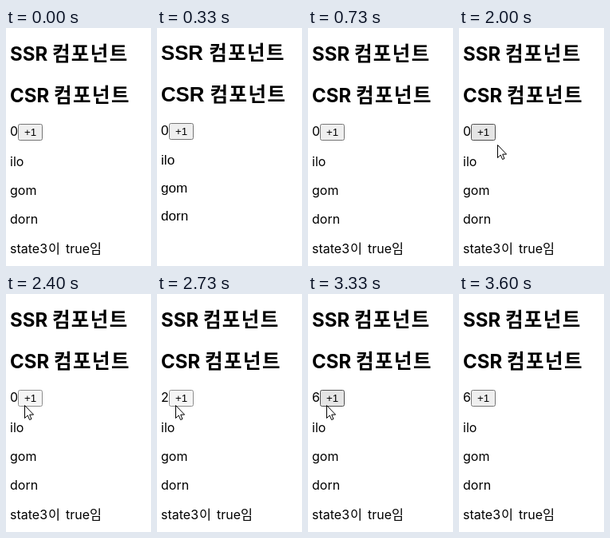
Animation, 182 px wide and 298 px high, one loop 3.99 s. Source, as an HTML page:

```html
<!DOCTYPE html>
<html lang="ko">
<head>
<meta charset="utf-8">
<style>
  html, body { margin: 0; width: 100%; height: 100%; overflow: hidden; background: #fff; }
  svg { display: block; width: 182px; height: 298px; }
  text { white-space: pre; }
  .web { font: 16px Inter, sans-serif; }
  .web .h { font-size: 24px; font-weight: 700; }
  .plain { font: 17.18px "Liberation Sans", Arial, sans-serif; }
  .plain .h { font-size: 25.78px; font-weight: 700; }
  .ko { font-family: "Noto Sans CJK KR", "Noto Sans CJK", sans-serif; font-size: 16.3px; letter-spacing: 1px; }
  .h .ko { font-size: 24.5px; letter-spacing: 1.45px; }
  #btn { font: 13.333px "Liberation Sans", Arial, sans-serif; }
</style>
</head>
<body>
<svg viewBox="0 0 182 298">
  <rect width="182" height="298" fill="#fff"/>
  <g id="web" class="web"></g>
  <g id="plain" class="plain"></g>
  <g id="btn">
    <rect id="face" x="15.5" y="120.5" width="30" height="20" rx="2"/>
    <text x="23" y="135">+1</text>
  </g>
  <path id="cursor" d="M.5 .5V16.5L4.2 13L6.6 18.5L9 17.5L6.7 12.1H11.6Z" fill="#fff" stroke="#000"/>
</svg>
<script>
const LOOP = 3990;
const $ = id => document.getElementById(id);
const show = (el, on) => el.setAttribute("visibility", on ? "visible" : "hidden");

const ko = (s, dx = 0) => `<tspan class="ko" dx="${dx}">${s}</tspan>`;
const line = (y, s, attr = "") => `<text x="5" y="${y}" ${attr}>${s}</text>`;
const head = (y, s) => line(y, `${s} ${ko("컴포넌트")}`, 'class="h"');

function page(el, top, first, step) {
  el.innerHTML = head(top, "SSR") + head(top + 52, "CSR") +
    line(top + 94, "0", 'class="count"') +
    ["ilo", "gom", "dorn"].map((s, i) => line(first + i * step, s)).join("");
}
page($("web"), 41, 173, 36);
page($("plain"), 40, 171, 35);
$("web").insertAdjacentHTML("beforeend",
  line(282, `state3${ko("이", 1)}<tspan dx="1.5"> true</tspan>${ko("임")}`, 'id="state"'));
const count = $("web").querySelector(".count");

// Button looks: [fill, border]
const looks = {
  idle: ["#efefef", "#767676"],
  hover: ["#e5e5e5", "#4f4f4f"],
  down: ["#f5f5f5", "#8d8d8d"]
};
const presses = [2400, 2530, 2730, 2930, 3130, 3270];
const releases = [2470, 2670, 2870, 3070, 3200, 3330];

// Pointer stops: [time, x, y]
const stops = [
  [2000, 48, 146], [2070, 0, 107], [2270, 20, 134],
  [2330, 23, 139], [3470, 70, 159], [3530, 148, 193]
];
const passed = (list, t) => list.filter(v => v <= t).length;

function draw(t) {
  const fallback = t >= 330 && t < 530;
  show($("web"), !fallback);
  show($("plain"), fallback);
  $("state").setAttribute("display", t >= 330 && t < 730 ? "none" : "inline");

  const clicks = passed(releases, t);
  count.textContent = clicks;

  const over = (t >= 2000 && t < 2070) || (t >= 2270 && t < 3470);
  const look = passed(presses, t) > clicks ? "down" : over ? "hover" : "idle";
  const [fill, border] = looks[look];
  $("face").setAttribute("fill", fill);
  $("face").setAttribute("stroke", border);
  $("btn").setAttribute("transform", `translate(0 ${fallback ? -1 : 0})`);

  const moving = t >= 2000 && t < 3600;
  show($("cursor"), moving);
  if (moving) {
    const [, x, y] = stops[passed(stops.map(s => s[0]), t) - 1];
    $("cursor").setAttribute("transform", `translate(${x} ${y})`);
  }
}

const start = performance.now();
function tick() {
  draw((performance.now() - start) % LOOP);
  requestAnimationFrame(tick);
}
tick();
</script>
</body>
</html>
```
